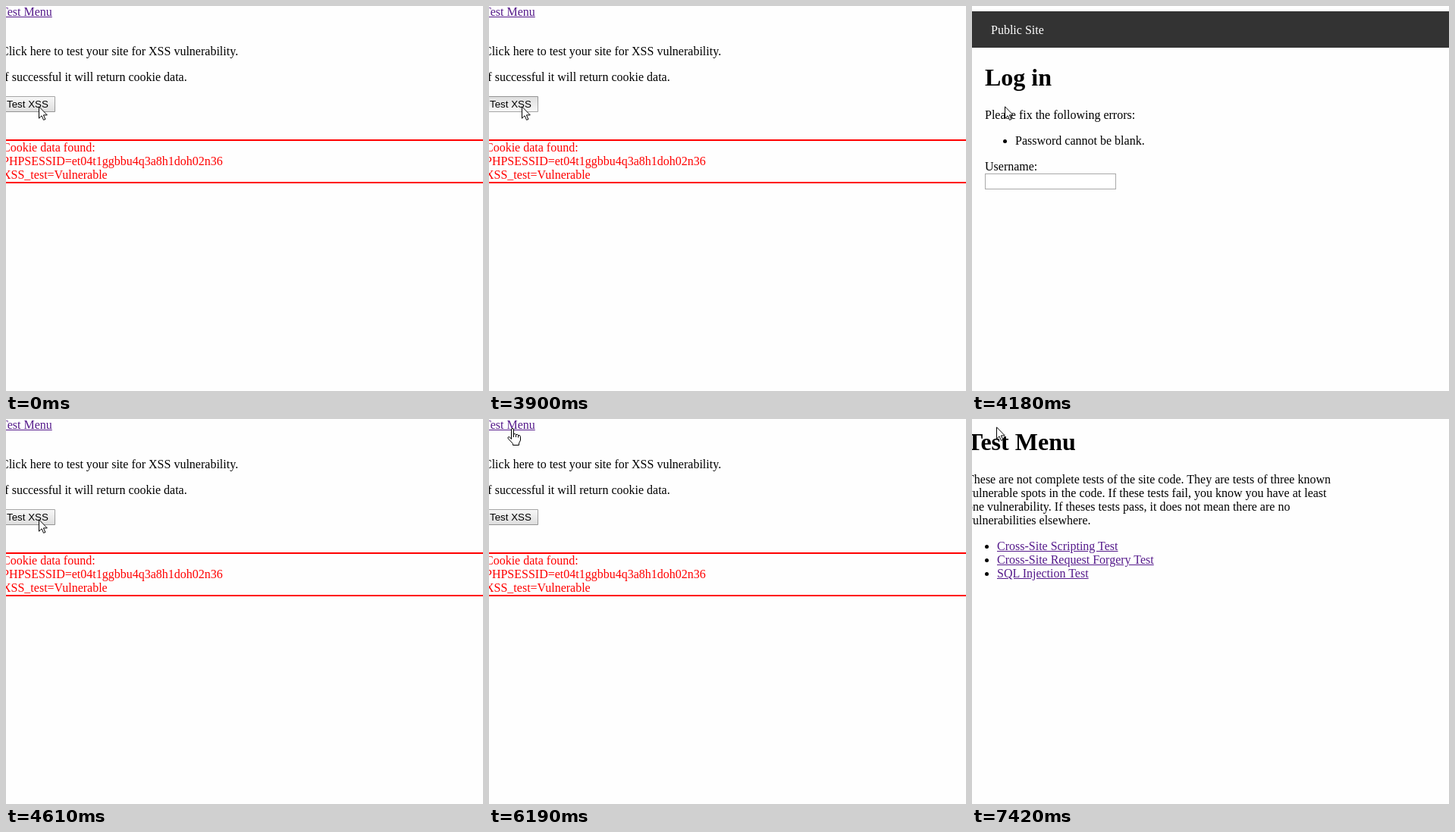
Recreate the animation shown at these times as an HTML page. Size 629 px wide and 508 px high, loop 8000 ms.

```html
<!DOCTYPE html>
<html lang="en">
<head>
<meta charset="utf-8">
<title>XSS test</title>
<style>
  html, body { margin: 0; width: 100%; height: 100%; overflow: hidden; background: #fefefe; }
  #stage {
    position: absolute; left: 0; top: 0; width: 629px; height: 508px; overflow: hidden;
    background: #fefefe; color: #000; white-space: nowrap; cursor: default;
    font: 16px/18px "Liberation Serif", "Times New Roman", serif;
  }
  #stage div, #stage svg { position: absolute; }
  #stage .page { inset: 0; visibility: hidden; }
  #stage .page.on { visibility: visible; }
  .h1 { font-size: 32px; line-height: 36px; font-weight: bold; }
  .link { color: #551a8b; text-decoration: underline; }
  .link.active { color: #f00; }
  .item::before {
    content: ""; position: absolute; left: -16px; top: 7px;
    width: 5px; height: 5px; border-radius: 50%; background: #000;
  }
  .result {
    left: -7px; top: 176px; width: 660px; height: 54px; color: #f00;
    border: 2px solid #f00;
  }
  .bar { left: 0; top: 7px; width: 629px; height: 48px; background: #333; }
  .field {
    left: 17px; top: 221px; width: 173px; height: 21px; box-sizing: border-box;
    border: 1px solid #a9a9a9; background: #fff;
  }
  #button {
    left: -7px; top: 119px; width: 72px; height: 21px; border-radius: 1px;
    background: linear-gradient(#f8f8f8, #ddd);
    box-shadow: inset 0 0 0 1px rgba(0, 0, 0, .333);
    font: 13.333px/15px "Liberation Sans", Arial, sans-serif;
  }
  #button.hover { box-shadow: inset 0 0 0 1px rgba(0, 0, 0, .5); }
  #button.down { background: linear-gradient(#ddd, #f8f8f8); }
  #button div { left: 8px; top: 3px; }
  #stage svg { left: 0; top: 0; overflow: visible; visibility: hidden; }
  #stage svg.on { visibility: visible; }
  svg path { fill: #fff; stroke: #000; stroke-linejoin: round; }
</style>
</head>
<body>
<div id="stage">
  <div class="page" id="xss">
    <div class="link" id="back" style="left:-7px;top:-1px">Test Menu</div>
    <div style="left:-7px;top:51px">Click here to test your site for XSS vulnerability.</div>
    <div style="left:-7px;top:85px">If successful it will return cookie data.</div>
    <div id="button"><div>Test XSS</div></div>
    <div class="result">Cookie data found:<br>PHPSESSID=et04t1ggbbu4q3a8h1doh02n36<br>XSS_test=Vulnerable</div>
  </div>

  <div class="page" id="login">
    <div class="bar"></div>
    <div style="left:25px;top:23px;color:#fff">Public Site</div>
    <div class="h1" style="left:17px;top:76px">Log in</div>
    <div style="left:17px;top:135px">Please fix the following errors:</div>
    <div class="item" style="left:57px;top:169px">Password cannot be blank.</div>
    <div style="left:17px;top:203px">Username:</div>
    <div class="field"></div>
  </div>

  <div class="page" id="menu">
    <div class="h1" style="left:-7px;top:12px">Test Menu</div>
    <div style="left:-7px;top:71px">These are not complete tests of the site code. They are tests of three known<br>vulnerable spots in the code. If these tests fail, you know you have at least<br>one vulnerability. If theses tests pass, it does not mean there are no<br>vulnerabilities elsewhere.</div>
    <div class="item" style="left:33px;top:159px"><span class="link">Cross-Site Scripting Test</span></div>
    <div class="item" style="left:33px;top:177px"><span class="link">Cross-Site Request Forgery Test</span></div>
    <div class="item" style="left:33px;top:195px"><span class="link">SQL Injection Test</span></div>
  </div>

  <svg id="arrow" width="12" height="19">
    <path d="M.5 .8V16.2L4 12.8 6.6 18.4 8.9 17.4 6.4 11.9H11.3Z"/>
  </svg>
  <svg id="hand" width="18" height="24">
    <path transform="translate(-6 0)" d="M5.5 14.5V2Q5.5 .5 7 .5T8.5 2V8Q11 6.8 11.5 8.5 14 7.6 14.5 9.5 17.4 9 17.5 11.5V16L15.5 20V22.5H7.5V20.5L1.2 13.8Q.3 11.6 2.4 11.5 4 12 5.5 14.5Z"/>
    <path d="M2.5 8V12M5.5 8.5V12M8.5 9.5V12.5"/>
  </svg>
</div>
<script>
  const LOOP = 8000;
  const $ = id => document.getElementById(id);

  // start ms, page, pointer, x, y, button or link state
  const steps = [
    [0,    "xss",   "arrow", 43, 132, ""],
    [290,  "xss",   "arrow", 43, 132, "hover"],
    [3900, "xss",   "arrow", 43, 132, "down"],
    [4060, "xss",   "arrow", 43, 132, "hover"],
    [4180, "login", "arrow", 43, 132, ""],
    [4610, "xss",   "arrow", 43, 132, ""],
    [5080, "xss",   "arrow", 43, 132, "hover"],
    [5350, "xss",   "arrow", 32, 82,  "hover"],
    [5490, "xss",   "arrow", 27, 32,  ""],
    [5610, "xss",   "arrow", 28, 20,  ""],
    [5750, "xss",   "arrow", 29, 18,  ""],
    [6030, "xss",   "arrow", 29, 16,  ""],
    [6190, "xss",   "hand",  30, 12,  ""],
    [6340, "xss",   "hand",  32, 10,  ""],
    [6750, "xss",   "hand",  32, 10,  "active"],
    [6870, "xss",   "arrow", 32, 10,  ""],
    [7020, "menu",  "hand",  32, 10,  ""],
    [7420, "menu",  "arrow", 32, 10,  ""]
  ];
  let current = null;

  function show(step) {
    if (step === current) return;
    current = step;
    const [, page, pointer, x, y, state] = step;
    for (const id of ["xss", "login", "menu"]) $(id).classList.toggle("on", id === page);
    for (const id of ["arrow", "hand"]) {
      $(id).classList.toggle("on", id === pointer);
      $(id).style.transform = `translate(${x}px, ${y}px)`;
    }
    for (const name of ["hover", "down"]) $("button").classList.toggle(name, state === name);
    $("back").classList.toggle("active", state === "active");
  }

  const start = performance.now();
  function tick() {
    const t = (performance.now() - start) % LOOP;
    show(steps.filter(s => s[0] <= t).pop());
    requestAnimationFrame(tick);
  }
  tick();
</script>
</body>
</html>
```
